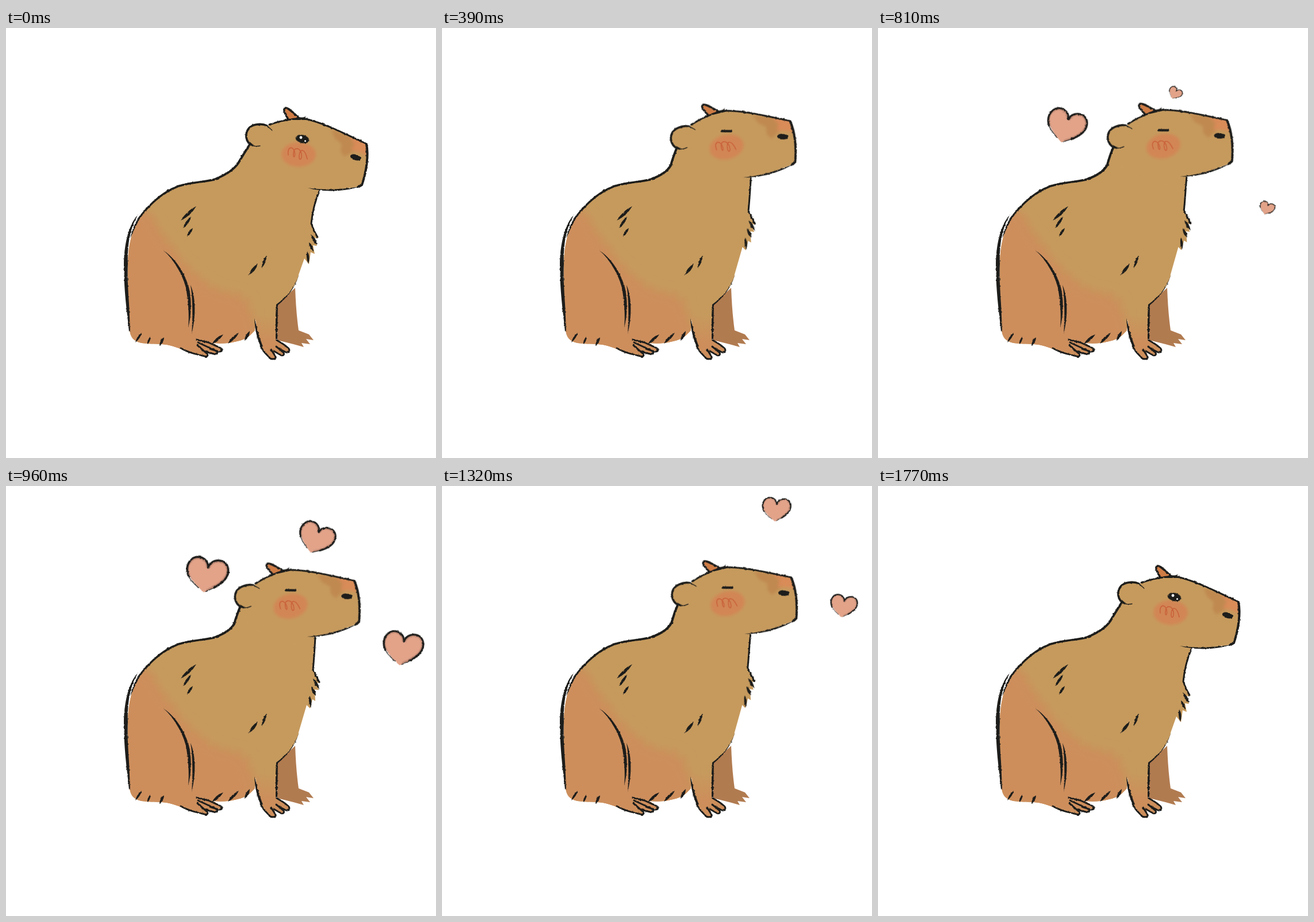
Animation of 748 by 748 pixels, one loop 1.8 s. Source, as an HTML page without scripts:

```html
<!DOCTYPE html>
<html lang="en">
<head>
<meta charset="utf-8">
<title>Happy capybara</title>
<style>
html, body { margin: 0; width: 100%; height: 100%; overflow: hidden; background: #fff; }
svg { display: block; width: 100vw; height: 100vh; }

.ink { fill: #1d1d1b; }
.line { fill: none; stroke: #1d1d1b; stroke-width: 3.6; stroke-linecap: round; stroke-linejoin: round; }
.tan { fill: #c69a5d; }
.mid { stroke-width: 3; }
.thin { stroke-width: 1.4; }
.bold { stroke-width: 4; }

.head, .neck, .fur, .open, .shut, .heart { animation: 1.8s linear infinite; }

/* head: lift, three gentle bobs, drop */
.head { transform-origin: 509px 220px; animation-name: head; }
@keyframes head {
  0%, 2.2% { transform: translate(0, 0) rotate(0deg); animation-timing-function: cubic-bezier(.4, 0, .4, 1); }
  16.7% { transform: translate(-13px, -16px) rotate(-14.3deg); animation-timing-function: ease-in-out; }
  21.7% { transform: translate(-14px, -13px) rotate(-13.4deg); animation-timing-function: ease-out; }
  25%, 53.3%, 83.3% { transform: translate(-14px, -11px) rotate(-12.8deg); animation-timing-function: ease-in-out; }
  38.3%, 68.3% { transform: translate(-11.5px, -17px) rotate(-13.7deg); animation-timing-function: ease-in-out; }
  84.4% { transform: translate(-14px, -11px) rotate(-12.8deg); animation-timing-function: cubic-bezier(.4, 0, .3, 1); }
  98.3%, 100% { transform: translate(0, 0) rotate(0deg); }
}

/* each neck part has three shapes: rest, low, high */
.neck { d: var(--rest); animation-name: neck; }
@keyframes neck {
  0%, 2.2% { d: var(--rest); animation-timing-function: cubic-bezier(.4, 0, .4, 1); }
  16.7% { d: var(--high); animation-timing-function: ease-in-out; }
  25%, 53.3%, 83.3% { d: var(--low); animation-timing-function: ease-in-out; }
  38.3%, 68.3% { d: var(--high); animation-timing-function: ease-in-out; }
  84.4% { d: var(--low); animation-timing-function: cubic-bezier(.4, 0, .3, 1); }
  98.3%, 100% { d: var(--rest); }
}
.skin {
  --rest: path("M330 330L366 262C385 254 398 244 404 235C411 223 418 212 425 201L500 190L545 282C538 300 533 320 531 340L543 366L536 365L541 379L534 378L537 393L530 390L527 411L519 401L508 432Z");
  --low: path("M330 330L366 262C382 256 392 248 397 240C400 228 404 218 409 206L490 190L538 261C537 280 536 300 534 319L546 343L540 342L544 355L537 354L538 374L533 371L529 387L523 381L508 432Z");
  --high: path("M330 330L366 262C384 256 395 247 400 237C403 226 407 214 412 203L490 190L536 256C534 275 533 296 531 316L544 340L538 340L541 354L535 353L537 372L532 369L527 386L522 381L508 432Z");
}
.nape {
  --rest: path("M366 262C385 254 398 244 404 235C411 223 418 212 425 201");
  --low: path("M366 262C382 256 392 248 397 240C400 228 404 218 409 206");
  --high: path("M366 262C384 256 395 247 400 237C403 226 407 214 412 203");
}
.chest {
  --rest: path("M545 284C538 300 533 320 531 340L536 353L542 364");
  --low: path("M538 263C537 280 536 300 534 319L539 330L545 341");
  --high: path("M536 258C534 275 533 296 531 316L537 328L543 339");
}
.fur { animation-name: fur; }
@keyframes fur {
  0%, 2.2% { transform: translate(0, 0); animation-timing-function: cubic-bezier(.4, 0, .4, 1); }
  16.7%, 38.3%, 68.3% { transform: translate(2px, -25px); animation-timing-function: ease-in-out; }
  25%, 53.3%, 83.3% { transform: translate(4px, -24px); animation-timing-function: ease-in-out; }
  84.4% { transform: translate(4px, -24px); animation-timing-function: cubic-bezier(.4, 0, .3, 1); }
  98.3%, 100% { transform: translate(0, 0); }
}

.open { animation-name: open; animation-timing-function: step-end; }
.shut { animation-name: shut; animation-timing-function: step-end; }
@keyframes open { 0% { opacity: 1; } 8.34% { opacity: 0; } 90% { opacity: 1; } }
@keyframes shut { 0% { opacity: 0; } 8.34% { opacity: 1; } 90% { opacity: 0; } }

.heart { transform: scale(0); }
.h1 { animation-name: h1; }
.h2 { animation-name: h2; }
.h3 { animation-name: h3; }
@keyframes h1 {
  0%, 30% { transform: translate(288px, 211px) rotate(36deg) scale(0); }
  36.7% { transform: translate(302px, 188px) rotate(25deg) scale(.74); }
  45% { transform: translate(327px, 172px) rotate(17deg) scale(.94); }
  53.3% { transform: translate(349px, 156px) rotate(10deg) scale(.99); }
  63.3% { transform: translate(373px, 133px) rotate(-1deg) scale(.9); }
  73.3%, 100% { transform: translate(354px, 102px) rotate(12deg) scale(0); }
}
@keyframes h2 {
  0%, 40% { transform: translate(503px, 127px) rotate(36deg) scale(0); }
  53.3% { transform: translate(539px, 92px) rotate(22deg) scale(.86); }
  63.3% { transform: translate(574px, 78px) rotate(9deg) scale(1); }
  71.7% { transform: translate(585px, 47px) rotate(3deg) scale(.85); }
  80%, 100% { transform: translate(568px, 20px) rotate(16deg) scale(0); }
}
@keyframes h3 {
  0%, 40% { transform: translate(668px, 332px) rotate(28deg) scale(0); }
  53.3% { transform: translate(690px, 284px) rotate(10deg) scale(.95); }
  63.3% { transform: translate(678px, 251px) rotate(31deg) scale(.93); }
  72.2% { transform: translate(700px, 214px) rotate(8deg) scale(.75); }
  80%, 100% { transform: translate(690px, 184px) rotate(20deg) scale(0); }
}
</style>
</head>
<body>
<svg viewBox="0 0 748 748">
  <defs>
    <filter id="rough" filterUnits="userSpaceOnUse" x="0" y="0" width="748" height="748" color-interpolation-filters="sRGB">
      <feTurbulence type="fractalNoise" baseFrequency=".25" numOctaves="2" seed="4"/>
      <!-- opaque noise keeps the shift centred on zero -->
      <feColorMatrix values="1 0 0 0 0  0 1 0 0 0  0 0 1 0 0  0 0 0 0 1" result="noise"/>
      <feDisplacementMap in="SourceGraphic" in2="noise" scale="2.6" xChannelSelector="R" yChannelSelector="G"/>
    </filter>
    <filter id="soft" x="-20%" y="-20%" width="140%" height="140%"><feGaussianBlur stdDeviation="2.5"/></filter>
    <filter id="haze" x="-20%" y="-20%" width="140%" height="140%"><feGaussianBlur stdDeviation="9"/></filter>
    <path id="torso" d="M366 262C340 268 322 268 300 276C270 288 247 310 231 331C219 352 212 380 212 412C211 450 213 490 215 524C216 538 222 545 236 548C250 550 265 549 280 551C295 554 308 560 322 565L350 571L349 565L367 567L363 561L375 562C372 553 362 549 356 547C366 549 376 549 386 548C402 546 416 542 424 535L433 526L434 506L437 532L444 553L450 563L463 576L470 573L466 563L481 570L484 566L477 558L491 564L493 559L470 542L471 481C490 468 502 452 509 431Z"/>
    <path id="face" d="M425 203L458 168C478 161 497 158 515 157C545 162 580 179 627 201C631 222 628 252 619 275C590 280 555 285 527 279L500 288L430 240Z"/>
    <clipPath id="inTorso"><use href="#torso"/></clipPath>
    <clipPath id="inFace"><use href="#face"/></clipPath>
    <path id="love" d="M0 30C-14 21-36 6-36-10C-36-23-27-30-18-30C-8-30-1-23 0-14C1-23 9-30 19-30C29-30 37-22 36-9C35 6 14 21 0 30Z"/>
    <clipPath id="inLove"><use href="#love"/></clipPath>
    <path id="shade" d="M200 310L238 318L262 334L250 338L270 350L258 354L284 366L268 372L298 383L286 388L304 400L300 407L322 416L313 426L336 429L333 440L350 440L350 456L368 450L370 466L386 456L392 471L407 458L408 480L424 470L417 500L431 492L426 512L436 520L430 560L390 580L200 580Z"/>
    <linearGradient id="paw" x2="0" y2="1">
      <stop offset="0" stop-color="#cd8e5b" stop-opacity="0"/>
      <stop offset=".6" stop-color="#cd8e5b"/>
    </linearGradient>
    <g id="heart">
      <use href="#love" fill="#e2a389"/>
      <path clip-path="url(#inLove)" d="M-27 13C-46-8-34-30-18-30C-8-30-1-23 0-14C1-23 9-30 19-30C29-30 37-22 36-9C35 4 20 18 5 27" fill="none" stroke="#6b4a3e" stroke-opacity=".25" stroke-width="8"/>
      <path class="line" d="M-31 7C-43-12-32-30-18-30C-8-30-1-23 0-14C1-23 9-30 19-30C29-30 37-22 36-9C35 2 25 12 16 19"/>
      <path class="line thin" d="M-31 7C-26 14-18 19-10 24M16 19L3 28"/>
    </g>
  </defs>

  <!-- far leg -->
  <path fill="#b17b50" d="M470 482L503 452C504 480 506 505 509 526L527 533L535 543L522 541L529 550L514 548L518 555L500 550L472 543Z"/>

  <use href="#torso" class="tan"/>
  <g clip-path="url(#inTorso)" fill="#cd8e5b">
    <use href="#shade" filter="url(#haze)"/>
    <use href="#shade" filter="url(#soft)" opacity=".4"/>
    <path fill="url(#paw)" d="M432 498H474V540L500 560V580H440Z"/>
  </g>
  <path class="neck skin tan"/>

  <g filter="url(#rough)">
    <path class="neck nape line bold"/>
    <path class="neck chest line mid"/>
    <g class="ink">
      <path d="M368 260C345 267 320 266 298 274C270 285 248 306 230 330C225 338 219 352 216 366C223 350 229 338 234 330C252 307 272 288 300 277C325 269 348 270 368 264Z"/>
      <path d="M230 324C215 340 206 370 205 410C205 445 208 475 211 500L214 528L216 526L214 480C212 450 211 430 212 410C211 375 216 348 230 324Z"/>
      <path d="M274 387C291 402 307 428 313 452C317 475 319 500 317 521C323 500 323 470 318 451C311 426 295 401 274 387Z"/>
      <path d="M321 447C325 470 325 505 323 532C330 505 331 470 321 447Z"/>
      <!-- fur ticks -->
      <path d="M304 335Q314 318 331 310Q321 327 304 335M308 348Q311 336 322 328Q319 341 308 348M315 363Q315 353 325 348Q323 358 315 363"/>
      <path d="M422 430Q426 417 438 410Q435 423 422 430M445 417Q445 405 453 396Q453 409 445 417"/>
      <path d="M225 547Q227 537 236 530Q234 540 225 547M246 550Q245 543 251 537Q252 545 246 550M267 553Q267 544 275 537Q275 547 267 553"/>
      <path d="M358 550Q365 537 378 533Q371 545 358 550M386 549Q392 536 405 530Q399 543 386 549M415 544Q415 534 424 527Q424 538 415 544"/>
      <!-- front leg -->
      <path d="M432 505C433 525 437 542 443 554L447 554C441 540 437 522 432 505Z"/>
      <path d="M510 428C502 452 488 468 470 481L469 500L469 541L472 541L473 482C490 468 503 452 510 428Z"/>
    </g>
    <g class="line mid">
      <path d="M443 553C447 564 454 568 460 575C465 577 470 575 469 572L461 559"/>
      <path d="M466 562L478 569C483 571 485 567 482 564L470 554M475 558L487 564C493 565 495 560 490 556C484 550 477 547 471 543"/>
      <path d="M304 557C316 564 328 567 346 571C352 572 352 568 348 565L333 552"/>
      <path d="M346 563L362 567C369 568 369 564 364 561L334 547M355 558L370 563C377 563 377 560 372 556L352 547L331 542"/>
    </g>
    <g class="fur ink">
      <path d="M530 359Q539 364 541 377Q532 371 530 359M527 373Q535 378 535 389Q527 384 527 373M524 389Q530 397 526 410Q521 400 524 389"/>
    </g>
  </g>

  <g class="head">
    <path fill="#cf7c45" d="M492 160L484 142L488 139L510 157Z"/>
    <use href="#face" class="tan"/>
    <g clip-path="url(#inFace)">
      <g filter="url(#soft)">
        <path fill="#b97945" opacity=".5" d="M566 176L612 192L606 214L588 224L582 214L584 202L572 192Z"/>
        <path fill="#dc8a59" opacity=".85" d="M596 186L634 200L632 224L614 216L600 212L606 202Z"/>
      </g>
    </g>
    <ellipse cx="509" cy="220" rx="30" ry="21.5" fill="#d28655" filter="url(#soft)"/>
    <path fill="none" stroke="#c9623c" stroke-width="1.6" stroke-linecap="round" d="M491 221C489 206 499 205 502 215C504 226 499 227 500 218C501 207 511 207 514 219C515 231 509 231 510 222C511 209 520 209 524 228"/>
    <path class="tan" d="M463 178C455 168 444 166 435 168C422 170 417 180 418 190C419 200 428 206 442 206L458 200Z"/>
    <g filter="url(#rough)">
      <path class="line" d="M491 159C486 150 481 142 486 139C491 138 500 148 510 157"/>
      <path class="line mid" d="M458 168C478 161 497 158 515 157C545 162 580 179 626 201"/>
      <path class="ink" d="M496 160L508 155L515 156L522 154L520 157L526 156L522 160Z"/>
      <path class="line bold" d="M627 202C631 222 627 250 619 273L612 277"/>
      <path class="ink" d="M614 276C590 280 555 283 525 278C550 286 590 285 614 276Z"/>
      <path class="line" d="M454 170C448 167 441 167 435 168C422 170 417 180 418 190C419 198 423 202 429 204"/>
      <path class="line thin" d="M463 178L454 170M428 204C432 206 437 206 442 205"/>
      <ellipse class="ink" cx="608" cy="225" rx="9.5" ry="5" transform="rotate(17 608 225)"/>
      <path class="line bold shut" d="M507 191L523 195"/>
      <ellipse class="ink open" cx="515.5" cy="193" rx="12" ry="7.2" transform="rotate(14 515 193)"/>
    </g>
    <g class="open" fill="#fff">
      <circle cx="513" cy="190.5" r="2.4"/>
      <circle cx="520.5" cy="196.5" r="1.5"/>
    </g>
  </g>

  <g filter="url(#rough)">
    <use href="#heart" class="heart h1"/>
    <use href="#heart" class="heart h2"/>
    <use href="#heart" class="heart h3"/>
  </g>
</svg>
</body>
</html>
```
